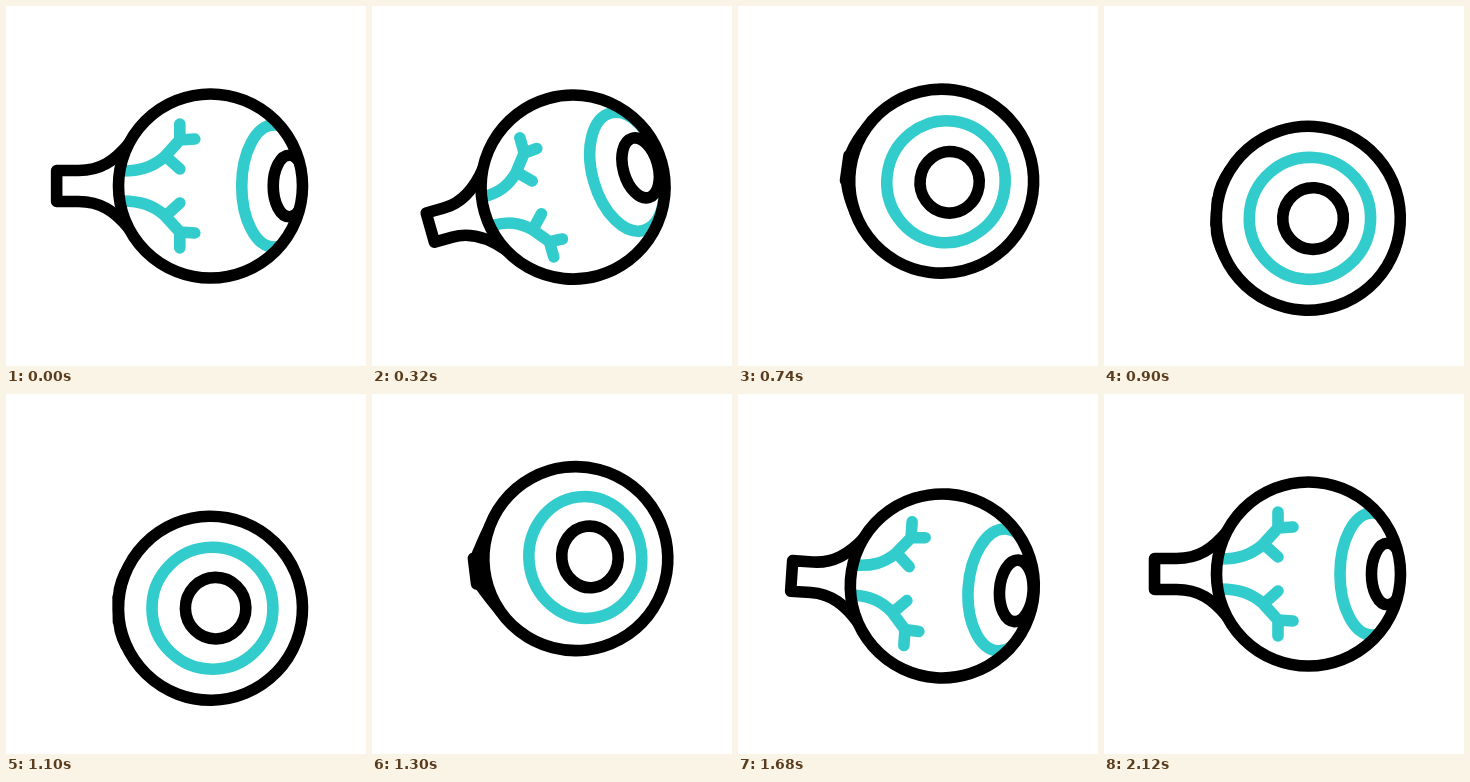
These frames come from a looping animation (360 by 360 pixels, 2.4 s). An HTML page with a canvas:

```html
<!DOCTYPE html>
<html lang="en">
<head>
<meta charset="utf-8">
<title>Eyeball</title>
<style>
  html, body { margin: 0; width: 100%; height: 100%; overflow: hidden; background: #fff; }
  canvas { display: block; width: 360px; height: 360px; }
</style>
</head>
<body>
<canvas id="stage"></canvas>
<script>
const LOOP = 2400, R = 92, LINE = 11.6;
const BLACK = '#000', TEAL = '#33cccc';

const canvas = document.getElementById('stage');
const ctx = canvas.getContext('2d');
const dpr = window.devicePixelRatio || 1;
canvas.width = canvas.height = 360 * dpr;

const smooth = p => p * p * (3 - 2 * p);
const sigmoid = x => 1 / (1 + Math.exp(-x));
const clamp = p => Math.max(0, Math.min(1, p));

// Eases from one turning point [time, value] to the next.
function swing(t, turns) {
  let value = turns[0][1];
  for (let i = 1; i < turns.length; i++) {
    const [t0, a] = turns[i - 1], [t1, b] = turns[i];
    value += (b - a) * smooth(clamp((t - t0) / (t1 - t0)));
  }
  return value;
}

// 1 = seen from the side, 0 = facing the viewer
const side = t => 1 - sigmoid((t - 495) / 86) + sigmoid((t - 1456) / 84);

const bounce = t => swing(t, [[0, 180], [270, 182], [640, 164], [1010, 225],
  [1365, 159], [1750, 195], [2120, 180]]);

const tilt = t => swing(t, [[0, 0], [340, -16], [750, 8], [1040, 0],
  [1330, -7.2], [1710, 4], [2120, 0]]);

function stroke(color) {
  ctx.strokeStyle = color;
  ctx.stroke();
}

function ring(x, rx, ry, color) {
  ctx.beginPath();
  ctx.ellipse(x, 0, rx, ry, 0, 0, Math.PI * 2);
  stroke(color);
}

function stalk(u) {
  const end = 91 + 80 * u - 17 * u * u;
  const k = (end - 82) / 72;
  const h = 12.5 + 3 * u;
  const neck = -92 - 4 * k, bend = 44 * k * k - end, straight = 22 * k * k - end;
  ctx.beginPath();
  ctx.moveTo(-81, -43);
  ctx.bezierCurveTo(neck, -25, bend, -h, straight, -h);
  ctx.lineTo(-end, -h);
  ctx.lineTo(-end, h);
  ctx.lineTo(straight, h);
  ctx.bezierCurveTo(bend, h, neck, 25, -81, 43);
  stroke(BLACK);
}

function vein(u, m) {
  const x = v => -90 + (v + 90) * u - 16 * (1 - u) ** 2;
  const line = (x0, y0, x1, y1) => {
    ctx.moveTo(x(x0), y0 * m);
    ctx.lineTo(x(x1), y1 * m);
  };
  ctx.beginPath();
  ctx.moveTo(x(-88), -15 * m);
  ctx.bezierCurveTo(x(-70), -15 * m, x(-58), -19 * m, x(-46), -29 * m);
  ctx.lineTo(x(-30.5), -46 * m);
  line(-30.5, -46, -30.5, -62);
  line(-30.5, -46, -15.5, -47);
  line(-45, -30, -30.5, -17);
  stroke(TEAL);
}

function draw(t) {
  const u = side(t), angle = tilt(t);
  ctx.setTransform(dpr, 0, 0, dpr, 0, 0);
  ctx.fillStyle = '#fff';
  ctx.fillRect(0, 0, 360, 360);
  ctx.translate(204.5 - 0.0137 * angle * angle, bounce(t));
  ctx.rotate(angle * Math.PI / 180);
  ctx.lineWidth = LINE;
  ctx.lineCap = ctx.lineJoin = 'round';

  stalk(u);

  ctx.save();
  ctx.beginPath();
  ctx.arc(0, 0, R, 0, Math.PI * 2);
  ctx.fill();
  ctx.clip();
  vein(u, 1);
  vein(u, -1);
  const squash = u * (1.2 - 0.2 * u);
  ring(1 + 62.5 * u, 61 - 29 * squash, 61, TEAL);
  ring(4 + 75 * u, 30.5 - 14.5 * squash, 30.8, BLACK);
  ctx.restore();

  ring(0, R, R, BLACK);
}

function frame() {
  draw(performance.now() % LOOP);
  requestAnimationFrame(frame);
}
frame();
</script>
</body>
</html>
```
